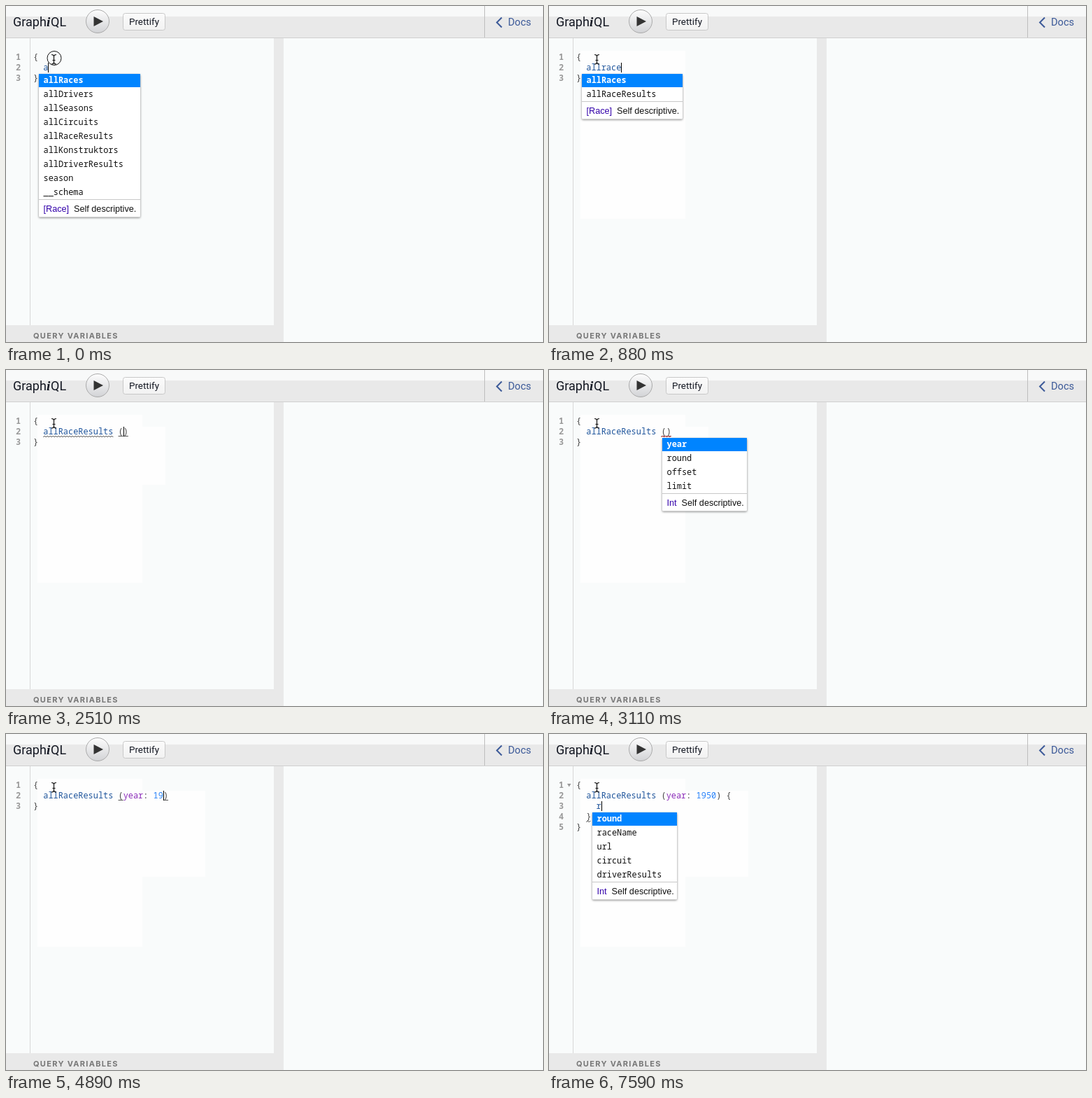
These frames come from a looping animation (768 px wide and 480 px high, 8000 ms). An HTML page:

```html
<!DOCTYPE html>
<html lang="en">
<head>
<meta charset="utf-8">
<title>GraphiQL query editor</title>
<style>
  html, body { margin: 0; width: 100%; height: 100%; overflow: hidden; background: #f9fbfb; }
  svg { display: block; }
  .ui { font-family: Roboto, sans-serif; }
  .code { font: 11.92px "Noto Sans Mono", monospace; }
  .info { font: 12.65px "Liberation Sans", sans-serif; }
  .bold { font-weight: 700; }
  .popup { filter: drop-shadow(0 1px 1.5px rgba(0, 0, 0, .5)); }
  .line { fill: none; stroke: #111; }
</style>
</head>
<body>
<svg width="768" height="480" viewBox="0 0 768 480">
  <defs>
    <linearGradient id="run" x2="0" y2="1"><stop stop-color="#fdfdfd"/><stop offset="1" stop-color="#d2d3d6"/></linearGradient>
    <linearGradient id="button" x2="0" y2="1"><stop stop-color="#fbfbfb"/><stop offset="1" stop-color="#f2f2f2"/></linearGradient>
  </defs>
  <rect width="768" height="480" fill="#f9fbfb"/>
  <rect width="768" height="46" fill="#e9e9e9"/>
  <rect width="768" height="15" fill="#f8f9f9"/>
  <rect y="45" width="768" height="1" fill="#d0d0d0"/>
  <rect x="684" width="1" height="45" fill="#bdbdbd"/>
  <rect x="383" y="46" width="14" height="434" fill="#e9e9e9"/>
  <rect y="456" width="384" height="24" fill="#e9e9e9"/>
  <rect x="34" y="46" width="1" height="410" fill="#d8d8d8"/>

  <g class="ui" fill="#141823">
    <text x="10" y="29" font-size="18">Graph</text>
    <text x="58" y="29" font-size="19" font-family="Liberation Serif, serif" font-style="italic" font-weight="700">i</text>
    <text x="64" y="29" font-size="18">QL</text>
    <circle cx="131" cy="22" r="16.5" fill="url(#run)" stroke="#aaa"/>
    <path d="M125.5 15L139 22L125.5 29Z" fill="#333"/>
    <rect x="167.500" y="10.500" width="60" height="24" rx="3" fill="url(#button)" stroke="#c8c8c8"/>
    <text x="176" y="27" font-size="13.400">Prettify</text>
    <path d="M709 16.500L702 23.500L709 30.500" fill="none" stroke="#3b5998" stroke-width="2"/>
    <text x="718" y="28" font-size="14.600" fill="#3b5998">Docs</text>
  </g>
  <text x="39" y="475" font-family="Inter, sans-serif" font-size="11" font-weight="700" letter-spacing="1.3" fill="#777">QUERY VARIABLES</text>

  <g id="editor" class="code"></g>
  <path class="line" stroke-width="1.200" d="M65 69.500Q68 69.500 68.500 71.500Q69 69.500 72 69.500M68.500 71V81M65 83Q68 83 68.500 81Q69 83 72 83M66.500 77.500H70.500"/>
  <circle id="click" class="line" cx="69" cy="74.500" r="10"/>
</svg>
<script>
const LOOP = 8000, COL = 7.15, LEFT = 39, ROW = 15, ITEM = 20;
const editor = document.getElementById('editor');
const click = document.getElementById('click');

const colX = col => LEFT + col * COL;
const baseline = row => 77 + row * ROW;
const rect = (x, y, w, h, fill, more = '') =>
  `<rect x="${x}" y="${y}" width="${w}" height="${h}" fill="${fill}" ${more}/>`;
const text = (x, y, s, fill, cls = '') => `<text x="${x}" y="${y}" fill="${fill}" class="${cls}">${s}</text>`;

// Options: squiggle / match / fold decorations and the completion popup.
const menu = (items, type, width, selected = 0) => ({ items: items.split(' '), type, width, selected });
const ALL = 'allRaces allDrivers allSeasons allCircuits allRaceResults allKonstruktors allDriverResults';
const RACES = 'allRaces allRaceResults';
const YEAR = menu('year round offset limit', 'Int', 121);
const FIELD = '  allRaceResults';
const UNFINISHED = [1, 2, 16], EMPTY_ARGS = [1, 17, 19, '#d22'];

const query = (time, line, col, more = {}) => ({ time, lines: ['{', line, '}'], row: 1, col, ...more });
const typed = (time, word, popup) => query(time, '  ' + word, 2 + word.length, { popup });
const args = (time, inner, more) =>
  query(time, `${FIELD} (${inner})`, 18 + inner.length, { match: [17, 18 + inner.length], ...more });
const nested = (time, inner, more = {}) => ({
  time, lines: ['{', FIELD + ' (year: 1950) {', '    ' + inner, '  }', '}'],
  row: 2, col: 4 + inner.length, ...more
});

const states = [
  typed(0, 'a', menu(ALL + ' season __schema', '[Race]', 145)),
  typed(140, 'al', menu(ALL, '[Race]', 145)),
  typed(290, 'all', menu(ALL, '[Race]', 145)),
  typed(590, 'allr', menu(RACES + ' allDrivers allCircuits allKonstruktors allDriverResults', '[Race]', 144)),
  typed(735, 'allra', menu(RACES, '[Race]', 144)),
  typed(880, 'allrace', menu(RACES, '[Race]', 144)),
  typed(1330, 'allrace', menu(RACES, '[RaceResult]', 179, 1)),
  typed(1620, 'allRaceResults'),
  typed(2070, 'allRaceResults '),
  args(2510, '', { squiggle: UNFINISHED }),
  args(2660, '', { squiggle: UNFINISHED, popup: YEAR }),
  args(2960, '', { squiggle: EMPTY_ARGS, popup: YEAR }),
  args(3110, '', { squiggle: EMPTY_ARGS, popup: YEAR, hideCaret: true }),
  args(3260, 'year'),
  args(3700, 'year:'),
  args(3840, 'year: '),
  args(4440, 'year: 1'),
  args(4890, 'year: 19'),
  args(5190, 'year: 195'),
  args(5490, 'year: 1950'),
  args(5940, 'year: 1950', { col: 29, squiggle: UNFINISHED }),
  query(6390, FIELD + ' (year: 1950) ', 30, { squiggle: UNFINISHED }),
  query(6540, FIELD + ' (year: 1950) {}', 31, { squiggle: UNFINISHED, match: [30, 31] }),
  nested(6840, '', { squiggle: UNFINISHED }),
  nested(7290, '', { squiggle: [3, 2, 3], fold: true }),
  nested(7440, 'r', { squiggle: [3, 2, 3], fold: true }),
  nested(7590, 'r', {
    squiggle: [3, 2, 3], fold: true,
    popup: menu('round raceName url circuit driverResults', 'Int', 121)
  })
];

// Areas that turn white once a popup has closed over them.
const patches = [
  { time: 140, box: [45, 64, 150, 240] },
  { time: 1620, box: [45, 81, 183, 83] },
  { time: 3260, box: [53, 81, 232, 123] }
];

function tokenColor(token) {
  if (token === 'year') return '#8b2bb9';
  if (/^\d/.test(token)) return '#2882f9';
  return /^\w/.test(token) ? '#1f559c' : '#444';
}

function drawLine(line, row) {
  const tokens = [...line.matchAll(/\w+|[^\w\s]/g)];
  return text(14, baseline(row), row + 1, '#999', 'bold') +
    tokens.map(m => text(colX(m.index), baseline(row), m[0], tokenColor(m[0]))).join('');
}

function drawSquiggle([row, from, to, color = '#333']) {
  const y = baseline(row) + 2, end = colX(to);
  let path = '';
  for (let x = colX(from), i = 0; x <= end; x += 2, i++) {
    path += `${i ? 'L' : 'M'}${x} ${y + (i % 2 ? 0 : 2)}`;
  }
  return `<path d="${path}" fill="none" stroke="${color}" stroke-width=".9"/>`;
}

function drawPopup({ items, type, width, selected }, row, col) {
  const x = Math.round(colX(col)) - 6, top = 97 + (row - 1) * ROW;
  const height = items.length * ITEM, divider = top - 1 + height;
  const rows = items.map((item, i) => {
    const active = i === selected;
    return (active ? rect(x, top + i * ITEM, width, 19, '#0084ff') : '') +
      text(x + 6.500, top + 13 + i * ITEM, item, active ? '#fff' : '#111', active ? 'bold' : '');
  });
  return rect(x, top, width, height + 24.500, '#fff', 'rx="1.5" class="popup"') + rows.join('') +
    rect(x, divider, width, 1, '#c8c8c8') +
    text(x + 6.500, divider + 18, `<tspan fill="#30a">${type}</tspan><tspan dx="7">Self descriptive.</tspan>`, '#111', 'info');
}

function draw(state) {
  const { lines, row, col, match = [], squiggle, popup, fold, hideCaret } = state;
  // The popup lines up with the start of the word being typed.
  const wordStart = lines[row].slice(0, col).search(/\w*$/);
  editor.innerHTML = [
    ...patches.filter(p => p.time <= state.time).map(p => rect(...p.box, '#fefefe')),
    ...lines.map(drawLine),
    ...match.map(c => rect(colX(c), baseline(row) + 2, COL, 1, '#555')),
    squiggle ? drawSquiggle(squiggle) : '',
    fold ? '<path d="M26 71H31.500L28.750 75.500Z" fill="#999"/>' : '',
    hideCaret ? '' : rect(Math.round(colX(col)), baseline(row) - 11, 1, 14, '#000'),
    popup ? drawPopup(popup, row, wordStart) : ''
  ].join('');
  click.style.display = state.time < 140 ? '' : 'none';
}

let shown;
function tick() {
  const time = performance.now() % LOOP;
  const state = states.findLast(s => s.time <= time);
  if (state !== shown) draw(shown = state);
  requestAnimationFrame(tick);
}
tick();
</script>
</body>
</html>
```
